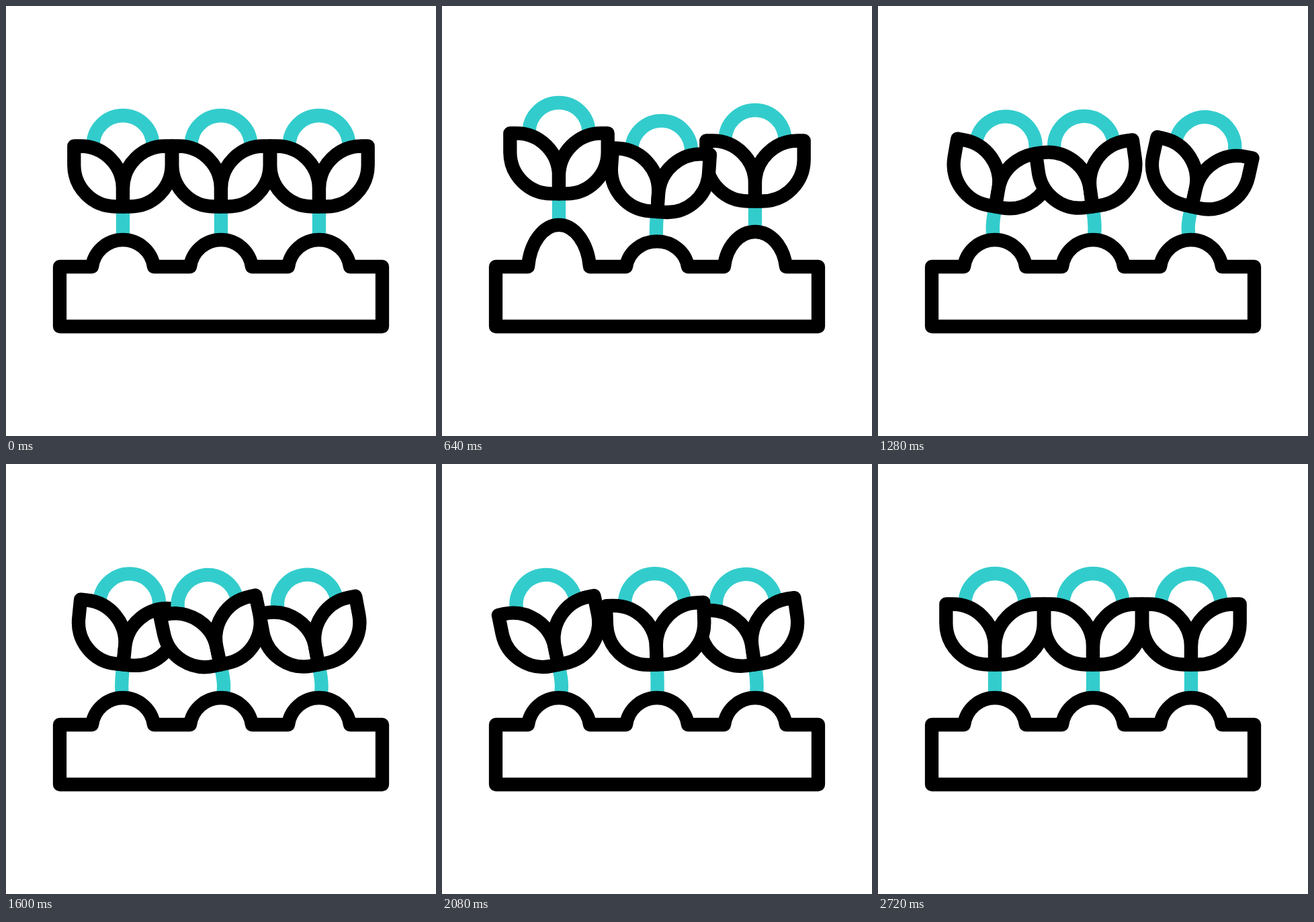
Recreate the animation shown at these times as an HTML page. Size 640 by 640 pixels, loop 3000 ms.

```html
<!DOCTYPE html>
<html lang="en">
<head>
<meta charset="utf-8">
<title>Plants</title>
<style>
  html, body { margin: 0; width: 100%; height: 100%; overflow: hidden; background: #fff; }
  svg { display: block; width: 100%; height: 100%; }
  path { stroke-width: 20.3; stroke-linejoin: round; }
  .teal { fill: none; stroke: #33cccc; }
  .ink { fill: #fff; stroke: #000; }
</style>
</head>
<body>
<svg viewBox="0 0 640 640">
  <defs>
    <path id="leaf" class="ink" d="M-72.7 208.5V237A62 62 0 0 0 -10.7 298.5H0V272A63.5 63.5 0 0 0 -63.5 208.5Z"/>
    <g id="flower">
      <path class="teal" d="M-44.5 207.5A44.5 44.5 0 0 1 44.5 207.5"/>
      <use href="#leaf"/>
      <use href="#leaf" transform="scale(-1 1)"/>
    </g>
  </defs>
  <g id="plants"></g>
  <path id="soil" class="ink"/>
</svg>
<script>
const LOOP = 3000, STEP = 40, REST = 2720;
const PIVOT = 303;

// Drawn from back to front: the middle plant covers its neighbours.
const plants = [
  { x: 174, hop: 410, sway: 450 },
  { x: 466, hop: 240, sway: 290 },
  { x: 320, hop: 0, sway: 0 }
];
const hopKeys = [[100, 0], [290, -25], [510, 9], [560, 9], [880, 0]];
const moundKeys = [[100, 0], [290, -29], [510, 5], [760, 0]];
const swayKeys = [[420, 0], [1015, 12.6], [1030, 12.6], [1390, -13.9], [2300, 0]];

const layer = document.getElementById('plants');
const soil = document.getElementById('soil');

function add(tag, attrs) {
  const el = document.createElementNS('http://www.w3.org/2000/svg', tag);
  for (const name in attrs) el.setAttribute(name, attrs[name]);
  return layer.appendChild(el);
}

for (const p of plants) {
  p.stem = add('path', { class: 'teal' });
  p.flower = add('use', { href: '#flower' });
}
const leftToRight = [...plants].sort((a, b) => a.x - b.x);

// Eased value of a key list at time t.
function track(keys, t) {
  if (t <= keys[0][0]) return keys[0][1];
  for (let i = 1; i < keys.length; i++) {
    const [t0, v0] = keys[i - 1], [t1, v1] = keys[i];
    if (t < t1) {
      const u = (t - t0) / (t1 - t0);
      return v0 + (v1 - v0) * u * u * (3 - 2 * u);
    }
  }
  return keys[keys.length - 1][1];
}

function drawPlant(p, t) {
  const dy = track(hopKeys, t - p.hop);
  const angle = track(swayKeys, t - p.sway);
  const top = PIVOT + dy;
  p.lift = track(moundKeys, t - p.hop);
  const foot = 354 + p.lift;
  const bend = 24 * Math.sin(angle * Math.PI / 180);
  p.flower.setAttribute('transform', `translate(${p.x} ${dy}) rotate(${angle} 0 ${PIVOT})`);
  p.stem.setAttribute('d',
    `M${p.x} ${top}C${p.x - bend} ${top + 20} ${p.x - bend * 1.2} ${foot - 16} ${p.x} ${foot}`);
}

// Each mound is a circular arc 40 high, stretched upwards by its lift.
function drawSoil() {
  let d = 'M80 388';
  for (const p of leftToRight) {
    const ry = 46.45 * (40 - p.lift) / 40;
    d += `H${p.x - 46}A46.45 ${ry} 0 0 1 ${p.x + 46} 388`;
  }
  soil.setAttribute('d', d + 'H560V477H80Z');
}

const start = performance.now();

function frame() {
  let t = (performance.now() - start) % LOOP;
  t = t >= REST ? LOOP : Math.floor(t / STEP) * STEP;
  for (const p of plants) drawPlant(p, t);
  drawSoil();
  requestAnimationFrame(frame);
}
frame();
</script>
</body>
</html>
```
